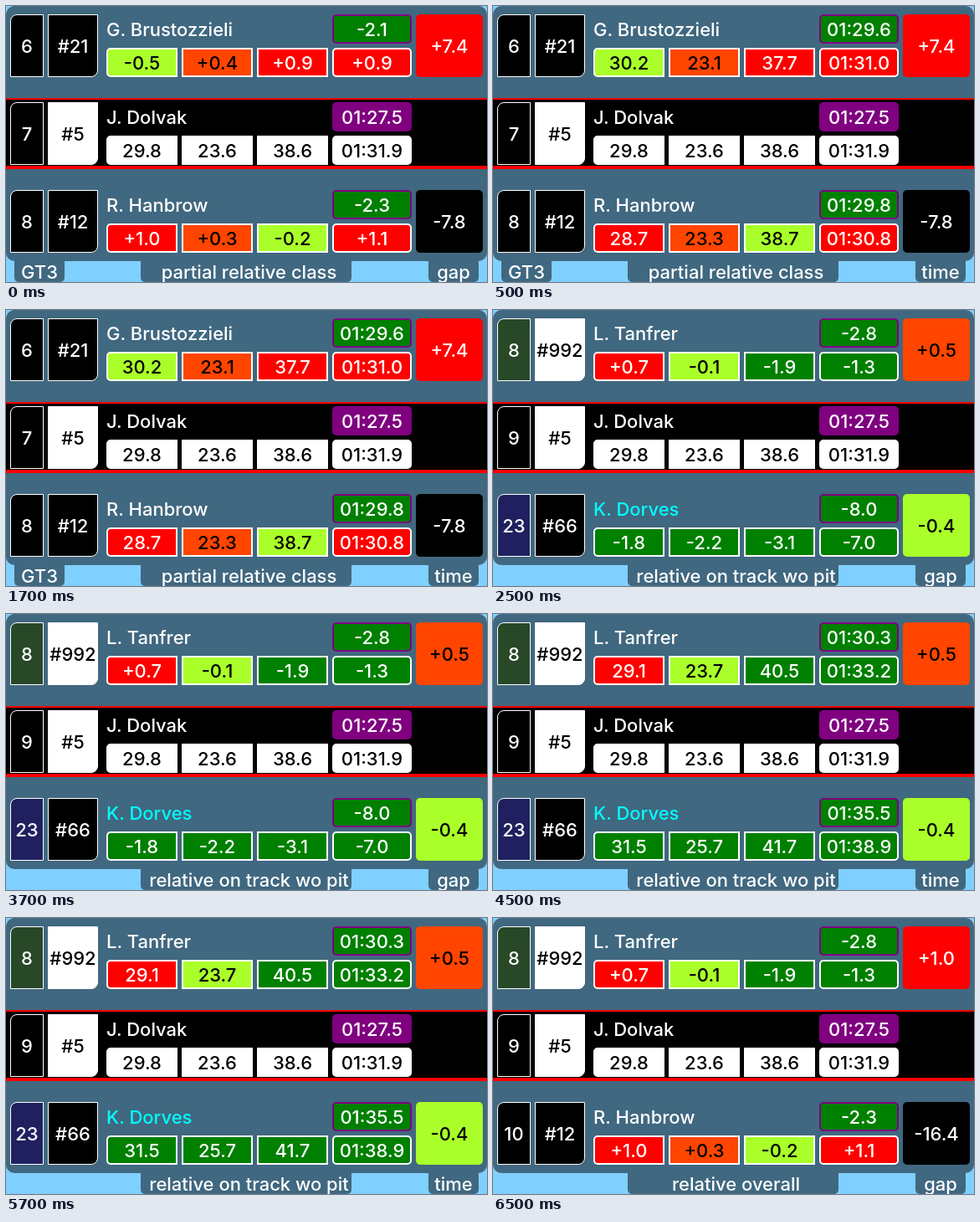
An HTML page for the animation above (8000 ms loop, 575 px wide and 330 px high).

```html
<!DOCTYPE html>
<html lang="en">
<head>
<meta charset="utf-8">
<title>Relative timing board</title>
<style>
html, body { margin: 0; width: 100%; height: 100%; overflow: hidden; background: #80d0ff; }
svg { display: block; width: 575px; height: 330px; }
text { font: 500 22px Inter, Roboto, sans-serif; white-space: pre; }
</style>
</head>
<body>
<svg id="board" viewBox="0 0 575 330"></svg>
<script>
const PANEL = "#406880", RED = "#ff0000", ORANGE = "#ff4500", LIME = "#aaff2a",
      GREEN = "#008000", PURPLE = "#800080", BLACK = "#000", WHITE = "#fff";
const darkText = [ORANGE, LIME, WHITE];
const ink = fill => darkText.includes(fill) ? BLACK : WHITE;

// Laps hold three sectors and the lap total, as differences and as times.
const drivers = {
  first: {
    name: "G. Brustozzieli", num: "#21", numFill: BLACK, posFill: BLACK,
    best: ["-2.1", "01:29.6"], fills: [LIME, ORANGE, RED, RED],
    laps: [["-0.5", "+0.4", "+0.9", "+0.9"], ["30.2", "23.1", "37.7", "01:31.0"]]
  },
  own: {
    name: "J. Dolvak", num: "#5", numFill: WHITE, posFill: BLACK, own: true,
    best: ["01:27.5", "01:27.5"], fills: [WHITE, WHITE, WHITE, WHITE],
    laps: Array(2).fill(["29.8", "23.6", "38.6", "01:31.9"])
  },
  chaser: {
    name: "R. Hanbrow", num: "#12", numFill: BLACK, posFill: BLACK,
    best: ["-2.3", "01:29.8"], fills: [RED, ORANGE, LIME, RED],
    laps: [["+1.0", "+0.3", "-0.2", "+1.1"], ["28.7", "23.3", "38.7", "01:30.8"]]
  },
  cup: {
    name: "L. Tanfrer", num: "#992", numFill: WHITE, posFill: "#284828",
    best: ["-2.8", "01:30.3"], fills: [RED, LIME, GREEN, GREEN],
    laps: [["+0.7", "-0.1", "-1.9", "-1.3"], ["29.1", "23.7", "40.5", "01:33.2"]]
  },
  lapped: {
    name: "K. Dorves", num: "#66", numFill: BLACK, posFill: "#202060", nameFill: "#00ffff",
    best: ["-8.0", "01:35.5"], fills: [GREEN, GREEN, GREEN, GREEN],
    laps: [["-1.8", "-2.2", "-3.1", "-7.0"], ["31.5", "25.7", "41.7", "01:38.9"]]
  }
};

// Each row: driver, position, gap, gap colour.
const inClass = [["first", 6, "+7.4", RED], ["own", 7], ["chaser", 8, "-7.8", BLACK]];
const onTrack = [["cup", 8, "+0.5", ORANGE], ["own", 9], ["lapped", 23, "-0.4", LIME]];
const overall = [["cup", 8, "+1.0", RED], ["own", 9], ["chaser", 10, "-16.4", BLACK]];

const views = [
  { at: 0, rows: inClass, title: "partial relative class", group: "GT3", mode: 0 },
  { at: 500, rows: inClass, title: "partial relative class", group: "GT3", mode: 1 },
  { at: 2500, rows: onTrack, title: "relative on track wo pit", mode: 0 },
  { at: 4500, rows: onTrack, title: "relative on track wo pit", mode: 1 },
  { at: 6500, rows: overall, title: "relative overall", mode: 0 }
];
const LOOP = 8000;

// Rectangle with radii in the order top left, top right, bottom right, bottom left.
function box(x, y, w, h, radii, fill, stroke = "none", line = 0) {
  const i = line / 2, l = x + i, t = y + i, r = x + w - i, b = y + h - i;
  const [p, q, s, u] = radii.map(v => Math.max(0, v - i));
  const d = `M${l + p} ${t}H${r - q}A${q} ${q} 0 0 1 ${r} ${t + q}V${b - s}` +
    `A${s} ${s} 0 0 1 ${r - s} ${b}H${l + u}A${u} ${u} 0 0 1 ${l} ${b - u}` +
    `V${t + p}A${p} ${p} 0 0 1 ${l + p} ${t}Z`;
  return `<path d="${d}" fill="${fill}" stroke="${stroke}" stroke-width="${line}"/>`;
}

const label = (x, y, str, fill = WHITE, anchor = "middle") =>
  `<text x="${x}" y="${y}" fill="${fill}" text-anchor="${anchor}">${str}</text>`;

function cell(x, y, w, h, radii, str, fill, stroke, line) {
  return box(x, y, w, h, radii, fill, stroke, line) +
    label(x + w / 2, y + h / 2 + 8.5, str, ink(fill));
}

function row([id, pos, gap, gapFill], index, mode) {
  const d = drivers[id], y = 10 + index * 105, round = [5, 5, 5, 5];
  let out = cell(5, y, 40, 75, [8, 0, 0, 0], pos, d.posFill, WHITE, 1) +
    cell(50, y, 60, 75, [0, 0, 8, 0], d.num, d.numFill, WHITE, 1) +
    label(120, y + 26, d.name, d.nameFill, "start") +
    cell(390, y, 95, 35, round, d.best[mode], d.own ? PURPLE : GREEN, PURPLE, 2);
  d.laps[mode].forEach((str, i) => {
    const radii = i === 3 ? round : i ? [0, 0, 0, 0] : [5, 0, 0, 5];
    out += cell(120 + i * 90, y + 40, i === 3 ? 95 : 85, 35, radii, str, d.fills[i], WHITE, 2);
  });
  if (gap) out += cell(490, y, 80, 75, round, gap, gapFill);
  return out;
}

function tab(x, w, textX, str) {
  return box(x, 300, w, 30, [0, 0, 5, 5], PANEL) + label(textX, 326, str);
}

function draw(view) {
  return box(0, 0, 575, 305, [10, 10, 10, 10], PANEL) +
    `<path d="M0 110H575V195H0Z" fill="${RED}"/><path d="M0 112H575V191H0Z"/>` +
    view.rows.map((r, i) => row(r, i, view.mode)).join("") +
    (view.group ? tab(10, 60, 40, view.group) : "") +
    tab(161, 252, 290.5, view.title) +
    tab(505, 60, 535, view.mode ? "time" : "gap");
}

const board = document.getElementById("board");
const start = performance.now();
let shown;

function update(now) {
  const t = Math.max(0, now - start) % LOOP;
  const view = views.findLast(v => v.at <= t);
  if (view !== shown) {
    board.innerHTML = draw(view);
    shown = view;
  }
  requestAnimationFrame(update);
}
update(start);
</script>
</body>
</html>
```
